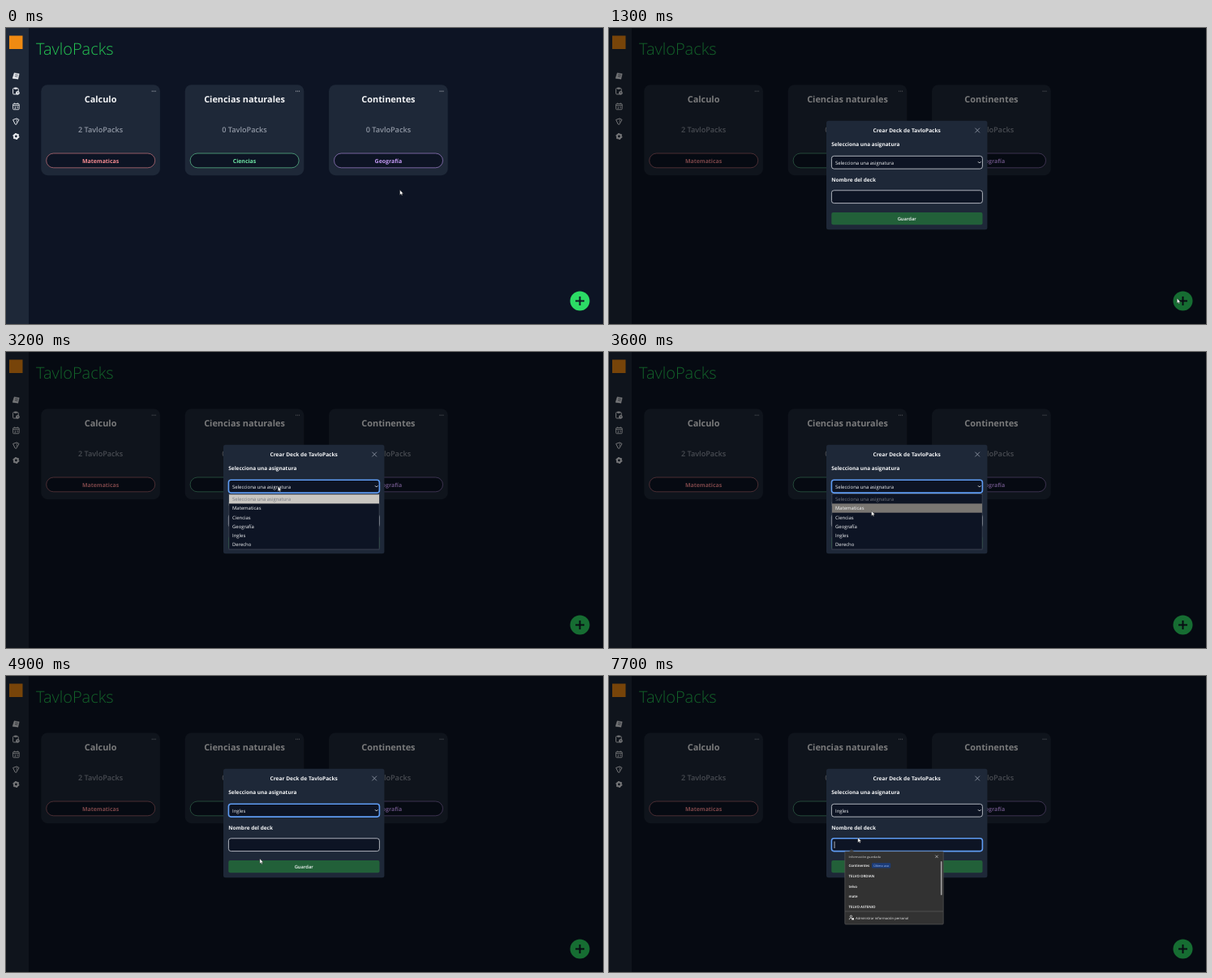
Write an HTML page that moves like this. It is 736 by 366 pixels and loops after 8 s.

```html
<!DOCTYPE html>
<html lang="es">
<head>
<meta charset="utf-8">
<style>
html, body { margin: 0; width: 100%; height: 100%; overflow: hidden; background: #0d1424; }
svg { display: block; width: 736px; height: 366px; }
text { font-family: "Open Sans", "Noto Sans", sans-serif; text-rendering: geometricPrecision; }
</style>
</head>
<body>
<svg id="stage" viewBox="0 0 736 366"></svg>
<script>
const BG = '#0d1424', PANEL = '#1e2838', APP = 'TavloPacks';
const PROMPT = 'Selecciona una asignatura';
const OPTIONS = [PROMPT, 'Matematicas', 'Ciencias', 'Geografía', 'Ingles', 'Derecho'];
const ROW_TOP = 176.2, ROW_H = 11.25;

const rect = (x, y, w, h, r, fill, extra = '') =>
  `<rect x="${x}" y="${y}" width="${w}" height="${h}" rx="${r}" fill="${fill}" ${extra}/>`;
const path = (d, stroke, width = 1, fill = 'none', extra = '') =>
  `<path d="${d}" stroke="${stroke}" stroke-width="${width}" fill="${fill}" ${extra}/>`;
const text = (x, y, size, weight, fill, str, anchor = 'start', id = '') =>
  `<text x="${x}" y="${y}" font-size="${size}" font-weight="${weight}" fill="${fill}" text-anchor="${anchor}" ${id && `id="${id}"`}>${str}</text>`;
const group = (id, body) => `<g id="${id}">${body}</g>`;
const at = (x, y, body) => `<g transform="translate(${x} ${y})">${body}</g>`;

function card(x, title, count, subject, color) {
  const mid = 73.3;
  return at(x, 70,
    rect(0, .2, 146.6, 112, 8, PANEL) +
    [0, 2, 4].map(d => rect(136.3 + d, 7.5, 1.2, 1.2, .6, '#b6bac2')).join('') +
    text(mid, 21.7, 10.9, 700, '#f3f4f6', title, 'middle') +
    text(mid, 58.6, 9.15, 600, '#8f96a3', `${count} ${APP}`, 'middle') +
    rect(6.4, 85, 134, 17.8, 8.9, BG, `stroke="${color}" stroke-width=".75" stroke-opacity=".75"`) +
    text(mid, 96.9, 6.95, 700, color, subject, 'middle'));
}

function sidebar() {
  const ink = '#e9ebef';
  return rect(0, 0, 28, 366, 0, PANEL) + rect(4, 9.5, 16.5, 16.5, 0, '#f08a12') +
    at(12.2, 59.7, path('M-2-4 4-3 2.5 3.5-4 2.5Z', ink, .6, ink) +
      path('M-1-2 2.6-1.4M-1.4 0 2.2 .6M-4 3.8 2 4.4', PANEL, .7)) +
    at(12.2, 78, rect(-3.6, -3.5, 6.6, 7.4, 1, 'none', `stroke="${ink}"`) +
      rect(-2, -4.4, 3.4, 2.2, .5, ink) + `<circle cx="2.2" cy="2.2" r="2.3" fill="${ink}"/>` +
      path('M2.2 1V2.4H3.2', PANEL, .6)) +
    at(12.4, 97, rect(-3.8, -3.4, 7.6, 7.2, 1, 'none', `stroke="${ink}" stroke-width=".9"`) +
      path('M-3.8-1.6H3.8M-2-4.4V-3M2-4.4V-3', ink, .9) +
      path('M-2 .2H-.6V2.4H-2M.8 .2H2V2.4', ink, .7)) +
    at(12.2, 115.5, path('M-3.6-2 1-3.6 3.8-2 .4 3.8-1 3.4Z', ink, 1) + path('M1.2-3 .8 1.4', ink, .7)) +
    at(12.4, 134, `<circle r="2.4" fill="none" stroke="${ink}" stroke-width="2"/>
      <circle r="3.5" fill="none" stroke="${ink}" stroke-width="1.2" stroke-dasharray="1.8 1.865"/>`);
}

const field = (id, y) =>
  rect(274.4, y, 186, 15.8, 3, BG, `id="${id}"`);

function modal() {
  return rect(268, 114.7, 198.4, 134.6, 2.5, PANEL) +
    text(367.2, 129.2, 6.6, 700, '#f3f4f6', `Crear Deck de ${APP}`, 'middle') +
    path('M451.4 123.7 457 129.4M457 123.7 451.4 129.4', '#8d95a3', .9) +
    text(274.3, 146.1, 6.45, 700, '#f3f4f6', PROMPT) +
    field('select', 158.3) +
    text(279, 168.8, 5.95, 400, '#f3f4f6', PROMPT, 'start', 'choice') +
    path('M455 165.3 456.7 167 458.4 165.3', '#f3f4f6', .9) +
    text(274.3, 190.2, 6.45, 700, '#f3f4f6', 'Nombre del deck') +
    field('input', 200.8) +
    rect(274.3, 228, 186.2, 15.2, 2, '#226039') +
    text(367.2, 237.9, 5.8, 600, '#f3f4f6', 'Guardar', 'middle');
}

function optionList() {
  return rect(274.9, 175.6, 185.2, 68.4, 0, BG, 'stroke="#4d5361" stroke-width=".6"') +
    rect(275, 0, 185, ROW_H, 0, '#777', 'id="mark"') +
    OPTIONS.map((name, i) =>
      text(279, ROW_TOP + i * ROW_H + 8, 5.95, 400, i ? '#f3f4f6' : '#747780', name)).join('');
}

function savedList() {
  const saved = ['Continentes', 'TELVO ORDIAN', 'telvo', 'mate', 'TELVO ASTENIO'];
  return path('M296.5 217 299 214.4 301.5 217Z', '#555', .5, '#333') +
    rect(290.8, 217, 121.4, 90, 1, '#323232', 'stroke="#565656" stroke-width=".7"') +
    text(295.5, 225.3, 3.8, 400, '#d4d4d4', 'Información guardada') +
    path('M402.3 221.6 405.7 225M405.7 221.6 402.3 225', '#ddd', .6) +
    rect(324, 231.2, 23.2, 6.2, 1, '#1c3c78') +
    text(335.6, 235.8, 3.7, 400, '#a9c7ff', 'Último uso', 'middle') +
    saved.map((name, i) => text(295.5, (i ? 236.8 : 236) + i * 12.45, 4.4, 600, '#fff', name)).join('') +
    rect(408.9, 229, 1.6, 42, .8, '#a0a0a0') +
    path('M291 291H412', '#5a5a5a', .7) +
    `<circle cx="298.4" cy="297.3" r="1.2" fill="none" stroke="#eee" stroke-width=".7"/>` +
    path('M296.3 301.2V300Q297 299.2 299 299.3', '#eee', .7) + rect(299.2, 299.2, 2.8, 2.4, .4, '#eee') +
    text(304, 300.8, 4.15, 400, '#eee', 'Administrar información personal');
}

const stage = document.getElementById('stage');
stage.innerHTML =
  rect(0, 0, 736, 366, 0, BG) + sidebar() +
  text(37, 33.2, 20, 300, '#25c653', APP) +
  card(43.3, 'Calculo', 2, 'Matematicas', '#f58a90') +
  card(220.7, 'Ciencias naturales', 0, 'Ciencias', '#6fe8a6') +
  card(398.1, 'Continentes', 0, 'Geografía', '#c399f5') +
  `<circle cx="707.5" cy="337.5" r="12" fill="#2cdb65"/>` +
  path('M702 337.5H713M707.5 332V343', '#111827', 2) +
  group('dialog', rect(0, 0, 736, 366, 0, '#000', 'opacity=".5"') + modal()) +
  group('options', optionList()) + group('saved', savedList()) +
  path('M278 204.5V213', '#f3f4f6', .7, 'none', 'id="caret"') +
  group('cursor',
    path('M.3 .2V6.4L1.7 5.1 2.6 7.1 3.6 6.6 2.7 4.8H4.5Z', '#222', .4, '#fff', 'id="arrow"') +
    path('M1 0Q1.8-.7 2.4 0V2.6L5 3.3Q5.8 3.8 5.4 5L4.7 7.6H1.6L-.6 4.6Q-.4 3.7 1 4.6Z', '#222', .4, '#fff', 'id="hand"'));

const $ = id => document.getElementById(id);
const show = (id, on) => $(id).style.display = on ? '' : 'none';

// Pointer keys: time, x, y
const KEYS = [
  [0, 485.3, 200], [200, 522, 224], [500, 640, 305], [700, 690, 339], [900, 699.3, 334.5],
  [1300, 700, 334], [1500, 700, 334], [1800, 560, 262], [2100, 350, 170], [2200, 334.6, 162.5],
  [3100, 334.6, 162.5], [3200, 335, 166], [3500, 326, 188], [3900, 315, 221], [4000, 312.8, 224.5],
  [4100, 312.6, 225.6], [4900, 312.6, 225.6], [5300, 306, 197], [5900, 306, 197],
  [6400, 306.5, 199.5], [8000, 306.5, 199.5]
];

function pointer(t) {
  const i = KEYS.findIndex(k => k[0] > t);
  const [a, b] = [KEYS[i - 1], KEYS[i]];
  const f = (t - a[0]) / (b[0] - a[0]);
  return [a[1] + (b[1] - a[1]) * f, a[2] + (b[2] - a[2]) * f];
}

function focus(id, on) {
  $(id).setAttribute('stroke', on ? '#5f9cf3' : '#d5d9e0');
  $(id).setAttribute('stroke-width', on ? 1.6 : .8);
}

function draw(now) {
  const t = Math.floor(now % 8000 / 100) * 100;
  const [x, y] = pointer(t);
  const onButton = t >= 900 && t < 1300;
  $('cursor').setAttribute('transform', `translate(${x} ${y})`);
  show('arrow', !onButton);
  show('hand', onButton);

  show('dialog', t >= 1300);
  show('options', t >= 2400 && t < 4300);
  show('saved', t >= 5700);
  show('caret', t >= 5700 && Math.floor((t - 5700) / 500) % 2 === 0);
  focus('select', t >= 2400 && t < 5600);
  focus('input', t >= 5600);
  $('choice').textContent = t < 4300 ? PROMPT : 'Ingles';

  const row = Math.max(0, Math.floor((y - ROW_TOP) / ROW_H));
  $('mark').setAttribute('y', ROW_TOP + row * ROW_H);
  $('mark').setAttribute('fill', row ? '#797672' : '#c9c6c1');
  requestAnimationFrame(draw);
}
draw(performance.now());
</script>
</body>
</html>
```
